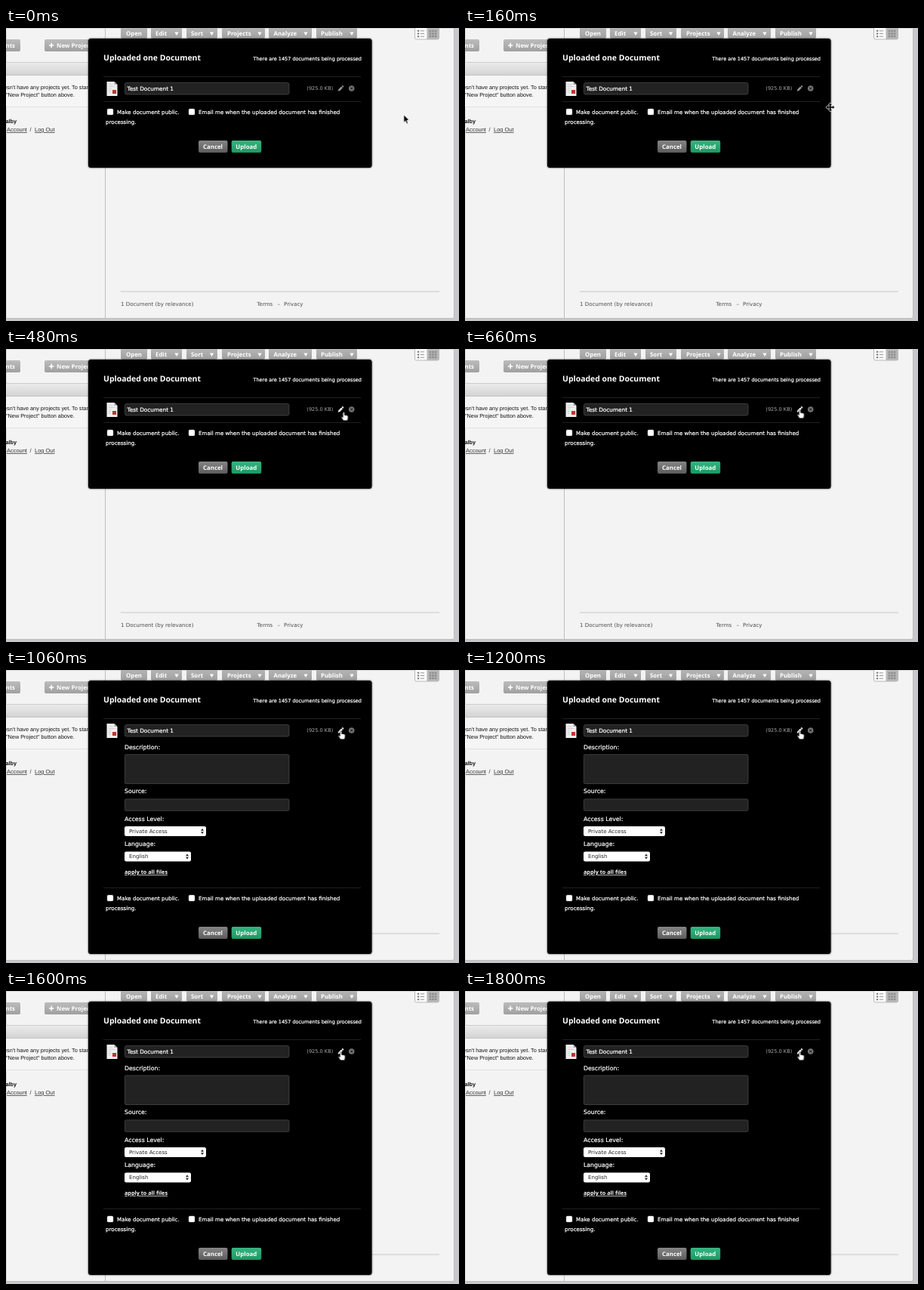
Animation, 600 px wide and 388 px high, one loop 1820 ms. Source, as an HTML page:

```html
<!DOCTYPE html>
<html lang="en">
<head>
<meta charset="utf-8">
<title>Upload dialog</title>
<style>
  html, body { margin: 0; width: 100%; height: 100%; overflow: hidden; background: #f3f3f3; }
  svg { display: block; width: 100vw; height: 100vh; }
  text { font: 7.12px "DejaVu Sans", Verdana, sans-serif; text-rendering: geometricPrecision; white-space: pre; }
  .bold { font: 700 7.85px "Open Sans", "Noto Sans", sans-serif; fill: #fff; }
  .title { font-size: 10.45px; }
  .apply { font-size: 7.24px; text-decoration: underline; }
  .arial { font: 7.3px "Liberation Sans", Arial, sans-serif; fill: #111; }
  .name { font-weight: 700; }
  .account { font-size: 7.45px; fill: #333; }
  .link { text-decoration: underline; }
  .foot { font-size: 7.05px; fill: #4c4c4c; }
  .white { fill: #fff; stroke: #fff; stroke-width: .22; }
  .status { font-size: 6.5px; }
  .label { font-size: 7.8px; }
  .value { font-size: 7.02px; }
  .entry { font-size: 7.3px; }
  .size { font-size: 6.6px; fill: #aaa; }
  .field { fill: #222; stroke: #484848; stroke-width: .8; }
  .rule { stroke: #2a2a2a; stroke-width: .8; }

  .panel, .form, .lower, .pencil, .cursor, .arrow, .move, .hand { animation: 1820ms step-end infinite; }
  .panel { height: 171px; animation-name: grow; filter: drop-shadow(0 .5px 1.2px rgba(0, 0, 0, .8)); }
  .form { animation-name: reveal; }
  .lower { animation-name: drop; }
  .pencil { animation-name: glow; }
  .cursor { animation-name: glide; }
  .arrow { animation-name: arrow; }
  .move { animation-name: move; }
  .hand { animation-name: hand; }

  @keyframes grow { 0% { height: 171px; } 58.2%, 100% { height: 362px; } }
  @keyframes reveal { 0% { visibility: hidden; } 58.2%, 100% { visibility: visible; } }
  @keyframes drop { 0% { transform: translateY(0); } 58.2%, 100% { transform: translateY(191px); } }
  @keyframes glow { 0% { fill: #999; } 26.4%, 100% { fill: #fff; } }
  @keyframes glide {
    0% { transform: translate(526.7px, 114.7px); }
    1% { transform: translate(526.7px, 114.7px); animation-timing-function: cubic-bezier(.33, .43, .67, .78); }
    8.79% { transform: translate(484px, 105px); animation-timing-function: cubic-bezier(.33, .52, .67, .73); }
    18.68% { transform: translate(461px, 92.5px); animation-timing-function: cubic-bezier(.33, .39, .67, .87); }
    29.67% { transform: translate(444px, 82px); animation-timing-function: linear; }
    36.2%, 100% { transform: translate(443.5px, 81px); }
  }
  @keyframes arrow {
    0%, 13.5% { visibility: visible; }
    8.2%, 26.4%, 100% { visibility: hidden; }
  }
  @keyframes move {
    0%, 13.5%, 100% { visibility: hidden; }
    8.2% { visibility: visible; }
  }
  @keyframes hand { 0% { visibility: hidden; } 26.4%, 100% { visibility: visible; } }
</style>
</head>
<body>
<svg viewBox="0 0 600 388" preserveAspectRatio="none">
  <defs>
    <linearGradient id="grey" x2="0" y2="1">
      <stop stop-color="#bcbcbc"/><stop offset="1" stop-color="#a0a0a0"/>
    </linearGradient>
    <linearGradient id="bar" x2="0" y2="1">
      <stop stop-color="#ececec"/><stop offset="1" stop-color="#d2d2d2"/>
    </linearGradient>
    <linearGradient id="cancel" x2="0" y2="1">
      <stop stop-color="#858585"/><stop offset="1" stop-color="#5c5c5c"/>
    </linearGradient>
    <linearGradient id="upload" x2="0" y2="1">
      <stop stop-color="#35b581"/><stop offset="1" stop-color="#1c9862"/>
    </linearGradient>
    <path id="down" d="M-2.6-2h5.2L0 2.4z" fill="#fff"/>
    <rect id="check" width="8" height="8" rx="1.6" fill="#fff" stroke="#aaa" stroke-width=".4"/>
    <path id="updown" d="M-2-.8L0-3.4 2-.8zM-2 .8L0 3.4 2 .8z" fill="#222"/>
  </defs>

  <!-- page -->
  <rect width="600" height="388" fill="#c8c8cc"/>
  <path d="M0 0h593.5v382q0 2.5-2.5 2.5H0z" fill="#f3f3f3" stroke="#b4b4b4" stroke-width=".8"/>
  <path d="M131.5 0v384" stroke="#bdbdbd"/>

  <!-- sidebar -->
  <rect x="-20" y="15" width="39" height="16" rx="2" fill="url(#grey)"/>
  <text class="bold" x="12" y="26" text-anchor="end">Documents</text>
  <rect x="51" y="15" width="70" height="16" rx="2" fill="url(#grey)"/>
  <path d="M57 23h6.4M60.2 19.8v6.4" stroke="#fff" stroke-width="1.6"/>
  <text class="bold" x="67" y="26">New Project</text>
  <rect y="45" width="131" height="18" fill="url(#bar)"/>
  <path d="M0 45.5h131M0 62.5h131" stroke="#c0c0c0" stroke-width=".7"/>
  <rect y="63" width="131" height="42" fill="#f5f5f5"/>
  <path d="M0 104.5h131" stroke="#dedede" stroke-width=".8"/>
  <text class="arial" x="-3" y="80.5">esn't have any projects yet. To start</text>
  <text class="arial" x="0" y="91">"New Project" button above.</text>
  <text class="arial name" x="-.5" y="126">alby</text>
  <text class="arial account link" x="1" y="137">Account</text>
  <text class="arial account" x="31.5" y="137">/</text>
  <text class="arial account link" x="38" y="137">Log Out</text>

  <!-- toolbar -->
  <g fill="url(#grey)">
    <rect x="152" y="-6" width="35" height="20" rx="2"/>
    <rect x="192" y="-6" width="41" height="20" rx="2"/>
    <rect x="239" y="-6" width="41" height="20" rx="2"/>
    <rect x="286" y="-6" width="57" height="20" rx="2"/>
    <rect x="348" y="-6" width="57" height="20" rx="2"/>
    <rect x="411" y="-6" width="54" height="20" rx="2"/>
  </g>
  <text class="bold" x="159" y="10">Open</text>
  <text class="bold" x="198" y="10">Edit</text>
  <text class="bold" x="245" y="10">Sort</text>
  <text class="bold" x="293" y="10">Projects</text>
  <text class="bold" x="354.5" y="10">Analyze</text>
  <text class="bold" x="417" y="10">Publish</text>
  <use href="#down" x="226" y="7.5"/>
  <use href="#down" x="272.5" y="7.5"/>
  <use href="#down" x="336" y="7.5"/>
  <use href="#down" x="397" y="7.5"/>
  <use href="#down" x="458" y="7.5"/>
  <rect x="541.5" y="-4" width="32" height="19" rx="2" fill="#fafafa" stroke="#aaa" stroke-width=".8"/>
  <path d="M557.5 0h16v13q0 2-2 2h-14z" fill="#b8b8b8"/>
  <path d="M545 3.8h2.2M545 7.5h2.2M545 11.2h2.2" stroke="#777" stroke-width="2"/>
  <path d="M548.8 3.8h5.2M548.8 7.5h5.2M548.8 11.2h5.2" stroke="#999"/>
  <path d="M560.5 4h10M560.5 7.5h10M560.5 11h10" stroke="#8e8e8e" stroke-width="2.5" stroke-dasharray="2.7 .9"/>

  <!-- footer -->
  <path d="M152 349h422" stroke="#c8c8c8"/>
  <text class="foot" x="152" y="368">1 Document (by relevance)</text>
  <text class="foot" x="332.5" y="368">Terms</text>
  <text class="foot" x="359.5" y="368">–</text>
  <text class="foot" x="368" y="368">Privacy</text>

  <!-- dialog -->
  <rect class="panel" x="109" y="14" width="375.5" rx="3.5" fill="#000"/>
  <text class="bold title" x="129" y="42.5">Uploaded one Document</text>
  <text class="white status" x="471" y="42.6" text-anchor="end">There are 1457 documents being processed</text>
  <path class="rule" d="M129 64.5h341"/>
  <path d="M133.5 71h10l4 4v15h-14z" fill="#f0f0f0"/>
  <path d="M143.5 71v4h4z" fill="#aaa"/>
  <path d="M135.5 75h6M135.5 77.5h9M135.5 80h4M135.5 82.5h4M135.5 85h4" stroke="#c4c4c4" stroke-width=".7"/>
  <rect x="141" y="82" width="5" height="5" fill="#c8322f"/>
  <rect class="field" x="157.4" y="72.4" width="217.6" height="15.6" rx="2.5"/>
  <text class="white entry" x="160.5" y="82.7">Test Document 1</text>
  <text class="size" x="433.3" y="82.4" text-anchor="end">(925.0 KB)</text>
  <path class="pencil" d="M439.7 83.7l.7-2.5 3.7-3.7 1.8 1.8-3.7 3.7zM444.6 77l.7-.7q.5-.4 1 0l.8.8q.4.5 0 1l-.7.7z"/>
  <circle cx="457.7" cy="80" r="3.8" fill="#747474"/>
  <path d="M456.2 78.5l3 3M459.2 78.5l-3 3" stroke="#111" stroke-width="1"/>

  <g class="form">
    <text class="white label" x="157" y="104.5">Description:</text>
    <rect class="field" x="157.4" y="111.9" width="217.6" height="38.6" rx="1.5"/>
    <text class="white label" x="157" y="163.2">Source:</text>
    <rect class="field" x="157.4" y="170.9" width="217.6" height="15.4" rx="1.5"/>
    <text class="white label" x="157" y="200">Access Level:</text>
    <rect x="157" y="207" width="108" height="13" rx="2.2" fill="#fff"/>
    <text class="value" x="163" y="216" fill="#222">Private Access</text>
    <use href="#updown" x="260" y="213.5"/>
    <text class="white label" x="157" y="233">Language:</text>
    <rect x="157" y="240.4" width="88" height="13" rx="2.2" fill="#fff"/>
    <text class="value" x="163" y="249.4" fill="#222">English</text>
    <use href="#updown" x="240" y="247"/>
    <text class="bold apply" x="157" y="270">apply to all files</text>
  </g>

  <g class="lower">
    <path class="rule" d="M129 97.5h341"/>
    <use href="#check" x="134" y="107"/>
    <text class="white" x="147" y="113.6">Make document public.</text>
    <use href="#check" x="242" y="107"/>
    <text class="white" x="255" y="113.6">Email me when the uploaded document has finished</text>
    <text class="white" x="132" y="127">processing.</text>
    <rect x="255" y="149" width="38.5" height="16" rx="2" fill="url(#cancel)"/>
    <text class="bold" x="274" y="160" text-anchor="middle">Cancel</text>
    <rect x="298.7" y="149" width="39.5" height="16" rx="2" fill="url(#upload)"/>
    <text class="bold" x="318.3" y="160" text-anchor="middle">Upload</text>
  </g>

  <!-- pointer -->
  <g class="cursor" stroke-linejoin="round">
    <path class="arrow" d="M0 0v10.6l2.4-2.2 1.6 3.8 1.9-.8-1.6-3.8h3.3z" fill="#000" stroke="#fff" stroke-width=".9"/>
    <path class="move" d="M0-5.6l2.2 2.4H.8v2.4h2.4v-1.4L5.6 0 3.2 2.2V.8H.8v2.4h1.4L0 5.6l-2.2-2.4h1.4V.8h-2.4v1.4L-5.6 0l2.4-2.2v1.4h2.4v-2.4h-1.4z"
      fill="#000" stroke="#fff" stroke-width="1.1" paint-order="stroke"/>
    <path class="hand" d="M-1.1.6Q-1-.4 0-.4T1.1.6v3q1-.6 1.7.2.9-.4 1.5.3 1.4-.2 1.4 1.3v2.4l-1 3H-.4L-3 6.9q-.5-1.1.6-1.3l1.3 1z"
      fill="#fff" stroke="#000" stroke-width=".6"/>
  </g>
</svg>
</body>
</html>
```
